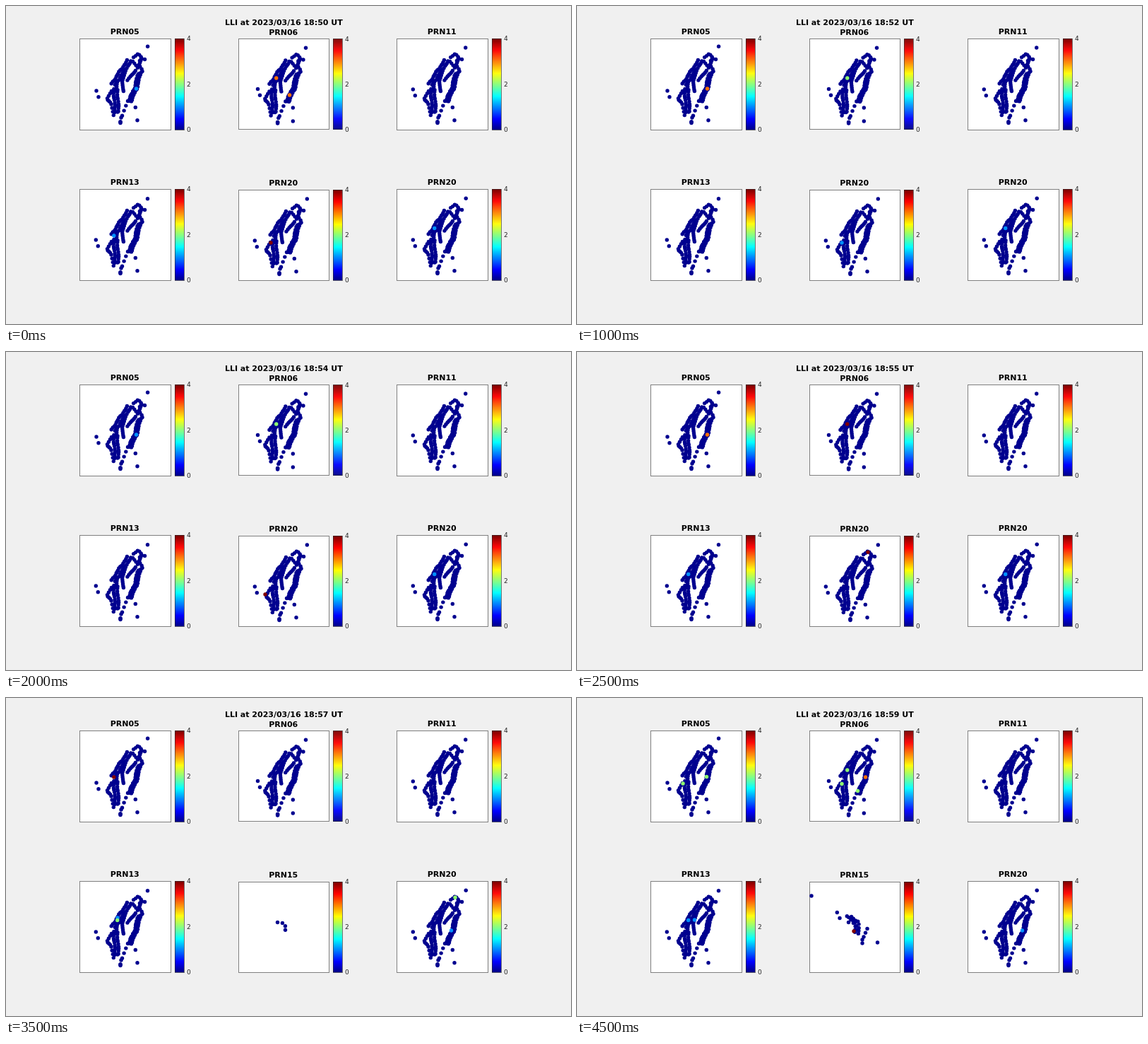
These frames come from a looping animation (800 px wide and 450 px high, 5000 ms). An HTML page:

```html
<!DOCTYPE html>
<html lang="en">
<head>
<meta charset="utf-8">
<title>LLI maps</title>
<style>
  html, body { margin: 0; width: 100%; height: 100%; overflow: hidden; background: #f0f0f0; }
  svg { display: block; width: 800px; height: 450px; }
  text { font-family: "DejaVu Sans", sans-serif; }
  .title { font-size: 11px; font-weight: bold; text-anchor: middle; fill: #000; }
  .tick { font-size: 9px; fill: #262626; }
</style>
</head>
<body>
<svg id="stage" viewBox="0 0 800 450"></svg>
<script>
const STEP_MS = 500, STEPS = 10;

// Jet colour map with 64 levels.
const clamp = v => Math.max(0, Math.min(1, v));
function jet(level) {
  const t = (level + 1) / 16;
  const rgb = [Math.min(t - 1.5, 4.5 - t), Math.min(t - 0.5, 3.5 - t), Math.min(t + 0.5, 2.5 - t)];
  return `rgb(${rgb.map(v => Math.round(clamp(v) * 255))})`;
}
const valueColor = v => jet(Math.min(63, v * 16));

// Spreads dots evenly along a path; a band alternates between its two sides.
function chain(count, path, spread = 0) {
  return Array.from({ length: count }, (_, i) => {
    const s = count > 1 ? i / (count - 1) * (path.length - 1) : 0;
    const k = Math.floor(s), a = path[k], b = path[k + 1] || a, f = s - k;
    const wobble = count > 3 ? 0.6 : 0, side = i % 2 ? spread : -spread;
    return [
      a[0] + (b[0] - a[0]) * f + side + wobble * Math.sin(i * 12.99 + count),
      a[1] + (b[1] - a[1]) * f + wobble * Math.sin(i * 7.23 + count)
    ];
  });
}

const northTip = chain(8, [[76, 26], [83, 22], [89, 28], [86, 31]]);
const northEast = chain(8, [[86, 31], [84, 38], [90, 46], [86, 49]]);
const eastCoast = chain(28, [[85, 50], [79, 72], [71, 89]], 1.8);
const northWest = chain(30, [[71, 31], [59, 48], [48, 65]], 3);
const inland = [
  chain(4, [[76, 33], [83, 41]]), chain(7, [[79, 45], [68, 59]]), chain(5, [[66, 46], [61, 58]]),
  chain(8, [[59, 56], [63, 74]]), chain(5, [[54, 62], [52, 74]])
].flat();
const southWest = chain(11, [[46, 75], [39, 85], [44, 92], [48, 108]]);
const plains = chain(21, [[51, 71], [53, 104]], 2.6);
const south = [
  chain(4, [[69, 89], [61, 109]]), chain(3, [[54, 104], [59, 112], [58, 118]]),
  chain(2, [[58, 118], [58, 119.5]]), chain(1, [[92.5, 29.5]]), chain(1, [[79.3, 97.5]])
].flat();
const island = [northTip, northEast, eastCoast, northWest, inland, southWest, plains, south].flat();

// Receivers of the rising satellite, in order of appearance.
const rising = [
  chain(4, [[56, 58], [63, 59], [67, 63], [67, 68]]), chain(16, [[56, 49], [67, 57], [67, 74]], 2.5),
  chain(3, [[77, 78], [82, 66.5]]), chain(2, [[75, 82], [75, 87]]),
  chain(2, [[43, 51.5], [39.3, 43.5]]), chain(1, [[96.5, 86]]), chain(1, [[3, 20]])
].flat();

// Receivers that light up.
const stations = {
  east: [80.5, 71], inner: [77.5, 70], coast: [79.5, 65.5], northwest: [53.7, 55.5],
  hill: [54, 52], upper: [58.5, 45.5], middle: [62.5, 55], centre: [62, 74.5],
  west: [48.8, 66], southwest: [46, 75], plain: [38, 83], north: [83, 23.3],
  southeast: [72.5, 79.5], valley: [68.5, 85], basin: [63, 70]
};

// lit: station and value for each step, separated by commas.
const panel = (x, y, size, ne, lit, name, more) =>
  ({ x, y, size, ne, lit: lit.split(','), name, west: [23.3, 72], se: [82, 115.8], skew: 0, ...more });
const panels = [
  panel(104, 46, 129, [96.6, 11.3],
    'east1,east3,east3,east1,east1,east3,west4,west4,,southwest2 coast2',
    () => 'PRN05', { west: [24, 74] }),
  panel(329, 46.5, 128, [95.5, 12.7],
    'northwest3 southeast3,centre2 inner1,northwest2,upper2 northwest2 southwest2,northwest2,'
    + 'northwest4,southwest1,,northwest2,northwest2 southwest2 coast3 valley2',
    () => 'PRN06', { west: [27.5, 71], se: [77.3, 116.5], skew: -0.02 }),
  panel(553, 46, 129, [97.7, 13], '', () => 'PRN11'),
  panel(104, 259, 129, [96.5, 13.7],
    'west1,east1,,,,northwest1,northwest3 valley1,hill1 northwest2,northwest1,northwest1 middle1',
    () => 'PRN13'),
  panel(329, 260, 128, [97.3, 13],
    'southwest4,southwest1,southwest1,plain4,plain4,north4,plain1 inner1,,,basin4',
    step => step < 7 ? 'PRN20' : 'PRN15',
    { dots: step => step < 7 ? null : rising.slice(0, [4, 14, 29][step - 7]) }),
  panel(553, 259, 129, [98.2, 13.3],
    'northwest1,'.repeat(7) + 'north2 inner1,inner1,inner1', () => 'PRN20')
];

const dot = ([x, y], value) =>
  `<circle cx="${x.toFixed(1)}" cy="${y.toFixed(1)}" r="2.7" fill="${valueColor(value)}"/>`;
const label = (cls, x, y, text) => `<text class="${cls}" x="${x}" y="${y}">${text}</text>`;
const frame = (x, y, w, h, color) =>
  `<rect x="${x}" y="${y}" width="${w}" height="${h}" fill="none" stroke="${color}"/>`;

function colorBar(x, y, height) {
  const band = height / 64;
  const bands = Array.from({ length: 64 }, (_, i) =>
    `<rect x="${x}" y="${y + height - (i + 1) * band}" width="13" height="${band + 0.3}" fill="${jet(i)}"/>`);
  const ticks = [0, 2, 4].map(v => label('tick', x + 17, y + height * (1 - v / 4) + 3.4, v));
  return bands.reverse().join('') + frame(x + 0.5, Math.floor(y) + 0.5, 13, height, '#26262699') + ticks.join('');
}

function drawPanel(p, step) {
  const { x, y, size, west } = p;
  const islets = [p.ne, west, [west[0] + 3, west[1] + 8.8], p.se];
  const dots = p.dots?.(step) || [...island.map(([dx, dy]) => [dx + p.skew * dy, dy]), ...islets];
  const lit = (p.lit[step] || '').split(' ').filter(Boolean);
  return `<rect x="${x}" y="${y}" width="${size}" height="${size}" fill="#fff"/>`
    + frame(x + 0.5, Math.floor(y) + 0.5, size, size, '#808080')
    + `<g transform="translate(${x} ${y})">`
    + dots.map(d => dot(d, 0)).join('')
    + lit.map(s => dot(stations[s.slice(0, -1)], +s.at(-1))).join('') + '</g>'
    + colorBar(x + size + 6, y, size)
    + label('title', x + size / 2 - 0.3, Math.round(y) - 6, p.name(step));
}

const stage = document.getElementById('stage');
let shown = -1;
function render() {
  const step = Math.floor(performance.now() / STEP_MS) % STEPS;
  if (step !== shown) {
    shown = step;
    stage.innerHTML = label('title', 393.3, 27, `LLI at 2023/03/16 18:5${step} UT`)
      + panels.map(p => drawPanel(p, step)).join('');
  }
  requestAnimationFrame(render);
}
render();
</script>
</body>
</html>
```
